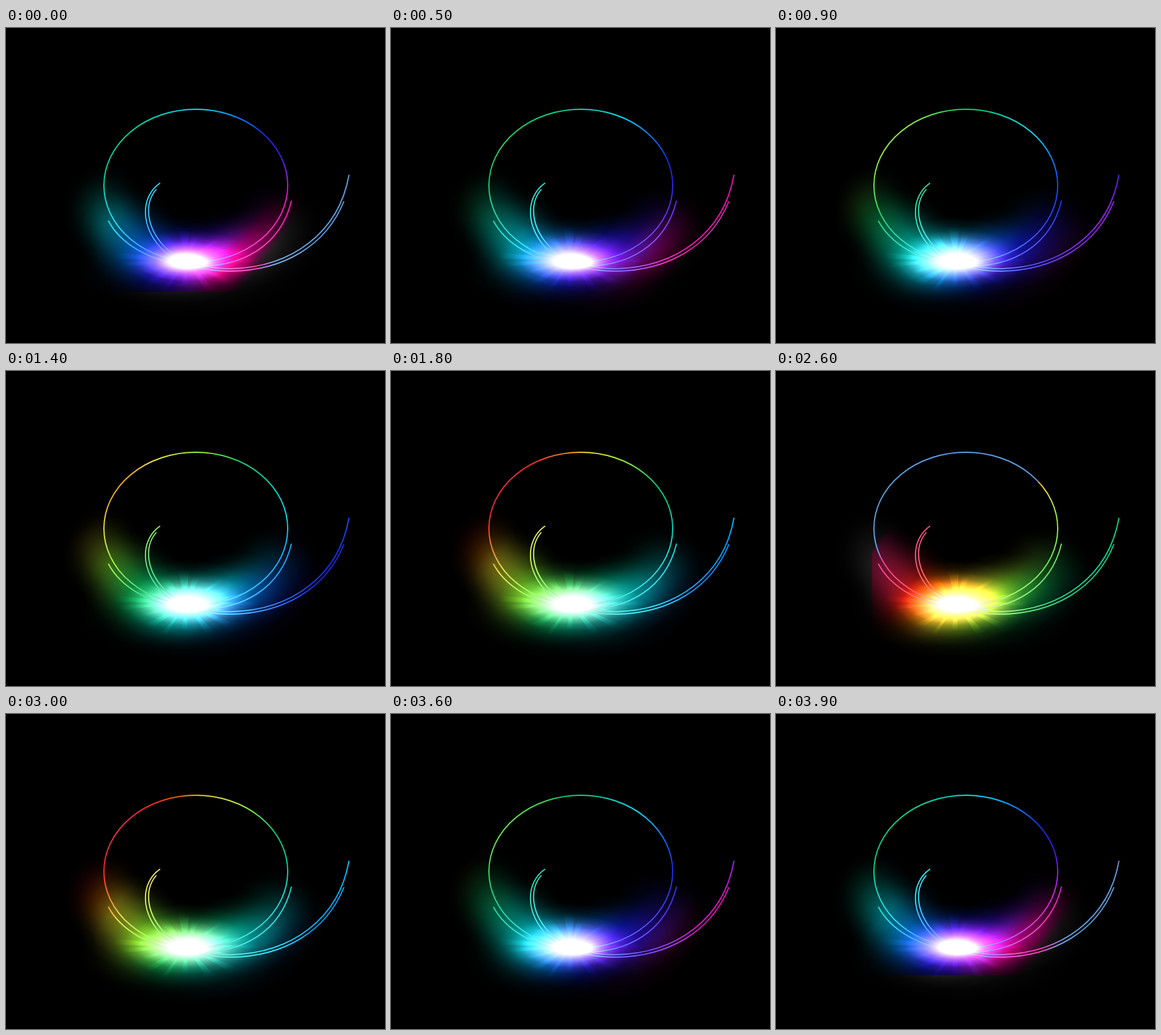
An HTML page with a canvas for the animation above (4000 ms loop, 600 px wide and 500 px high).

```html
<!DOCTYPE html>
<html lang="en">
<head>
<meta charset="utf-8">
<title>Rainbow flare</title>
<style>
  html, body { margin: 0; width: 100%; height: 100%; overflow: hidden; background: #000; }
  canvas { display: block; }
</style>
</head>
<body>
<canvas id="stage" width="600" height="500"></canvas>
<script>
const W = 600, H = 500, LOOP = 4000, TURN = 2600, STEP = 100;
const stage = document.getElementById('stage').getContext('2d');

function layer() {
  const c = document.createElement('canvas');
  c.width = W;
  c.height = H;
  return c.getContext('2d');
}

// Soft elliptical spot, added to what is already there
function blob(g, x, y, rx, ry, a, rgb = '255,255,255') {
  g.save();
  g.globalCompositeOperation = 'lighter';
  g.translate(x, y);
  g.scale(rx, ry);
  const r = g.createRadialGradient(0, 0, 0, 0, 0, 1);
  [[0, 1], [.2, .9], [.4, .63], [.6, .32], [.8, .1], [1, 0]]
    .forEach(([at, k]) => r.addColorStop(at, `rgba(${rgb},${a * k})`));
  g.fillStyle = r;
  g.fillRect(-1, -1, 2, 2);
  g.restore();
}

// Crescent-shaped glow
const glow = layer();
[
  [155, 292, 65, 75, .24], [195, 330, 80, 75, .4], [235, 365, 100, 75, .3],
  [285, 368, 115, 68, .6], [295, 380, 180, 78, .3], [365, 352, 90, 65, .5],
  [425, 325, 80, 78, .27]
].forEach(b => blob(glow, ...b));

// Tinted flare with rays
const flare = layer();
blob(flare, 285, 367, 105, 46, .55);
let seed = 7;
const rand = () => (seed = seed * 16807 % 2147483647) / 2147483647;
flare.save();
flare.globalCompositeOperation = 'lighter';
flare.translate(285, 369);
flare.scale(1, .5);
for (let i = 0; i < 18; i++) {
  const a = (i + rand() * .7) * Math.PI / 9, len = 75 + rand() * 45, w = .04 + rand() * .05;
  const r = flare.createRadialGradient(0, 0, 0, 0, 0, len);
  r.addColorStop(0, 'rgba(255,255,255,.2)');
  r.addColorStop(.6, 'rgba(255,255,255,.14)');
  r.addColorStop(1, 'rgba(255,255,255,0)');
  flare.fillStyle = r;
  flare.beginPath();
  flare.moveTo(0, 0);
  flare.arc(0, 0, len, a - w, a + w);
  flare.fill();
}
flare.restore();

// Constant warm light and white centre
const core = layer();
blob(core, 292, 367, 105, 46, .85, '255,40,60');
const white = layer();
blob(white, 283, 370, 80, 32, 1);
blob(white, 285, 370, 48, 20, .7);
blob(white, 303, 373, 45, 14, .4);

// Ring and sweeping curves
const ring = new Path2D();
ring.ellipse(300.5, 250, 145.5, 121, 0, 0, Math.PI * 2);
const curves = [
  ring,
  new Path2D('M162 306C180 340 225 373 300 378C375 380 435 345 452 274'),
  new Path2D('M244 246C212 268 212 318 250 354C275 374 310 386 356 386C440 385 507 345 535 275'),
  new Path2D('M238 256C219 278 220 318 256 352C280 371 312 382 356 382C452 380 527 325 543 233')
];
const lines = layer();
lines.strokeStyle = '#fff';
lines.lineWidth = 1.9;
curves.forEach(p => lines.stroke(p));

const shine = layer();
const fade = shine.createRadialGradient(300, 375, 0, 300, 375, 200);
fade.addColorStop(0, 'rgba(255,255,255,.7)');
fade.addColorStop(.5, 'rgba(255,255,255,.3)');
fade.addColorStop(1, 'rgba(255,255,255,0)');
shine.strokeStyle = fade;
shine.lineWidth = 1.4;
curves.forEach(p => shine.stroke(p));

// Distance from the teal middle, colour
const SPECTRUM = [
  [-310, 'rgba(255,32,112,0)'], [-303, '#ff2888'], [-255, '#ff2050'], [-225, '#ff2018'],
  [-195, '#ff7800'], [-162, '#ffe428'], [-105, '#90fa30'], [-50, '#10d060'], [0, '#00d8a8'],
  [65, '#00e4ff'], [115, '#0080ff'], [165, '#1020f0'], [205, '#3c10e8'], [232, '#9818f0'],
  [258, '#ff00b0'], [280, '#ff00a0'], [300, 'rgba(255,0,160,0)']
];
const FROM = -310, SPAN = 610;

const buf = layer();

// Colours a mask with the rainbow panel at shift s, over a plain base colour
function tint(mask, base, alpha, s, lag = 0) {
  const mid = 250 + 350 * s + lag, a = mid + FROM, b = a + SPAN;
  const grad = buf.createLinearGradient(.8 * a, .6 * a, .8 * b, .6 * b);
  SPECTRUM.forEach(([d, col]) => grad.addColorStop((d - FROM) / SPAN, col));
  const left = 152 - 315 * (1 - s);
  const top = 176 - 220 * (1 - s);
  const bottom = s < .1 ? 419 - 100 * s : H;

  buf.globalCompositeOperation = 'copy';
  buf.fillStyle = base;
  buf.fillRect(0, 0, W, H);
  buf.globalCompositeOperation = 'source-over';
  buf.globalAlpha = alpha;
  buf.fillStyle = grad;
  buf.fillRect(left, top, W - left, bottom - top);
  buf.globalAlpha = 1;
  buf.globalCompositeOperation = 'destination-in';
  buf.drawImage(mask.canvas, 0, 0);
  stage.drawImage(buf.canvas, 0, 0);
}

// Slow start away from the rest pose, quicker way back
function shiftAt(t) {
  const k = t < TURN ? t / TURN : (LOOP - t) / (LOOP - TURN);
  return k ** 1.2;
}

function draw(t) {
  const s = shiftAt(t);
  stage.globalCompositeOperation = 'source-over';
  stage.fillStyle = '#000';
  stage.fillRect(0, 0, W, H);
  stage.globalCompositeOperation = 'lighter';
  tint(glow, '#555155', 1, s);
  tint(flare, '#777', 1, s);
  stage.drawImage(core.canvas, 0, 0);
  stage.globalCompositeOperation = 'source-over';
  tint(lines, '#5a9fe0', .92, s, 15);
  stage.drawImage(shine.canvas, 0, 0);
  stage.drawImage(white.canvas, 0, 0);
}

let start = null, last = -1;
function tick(now) {
  if (start === null) start = now;
  const t = Math.floor((now - start) % LOOP / STEP) * STEP;
  if (t !== last) draw(last = t);
  requestAnimationFrame(tick);
}
draw(0);
requestAnimationFrame(tick);
</script>
</body>
</html>
```
